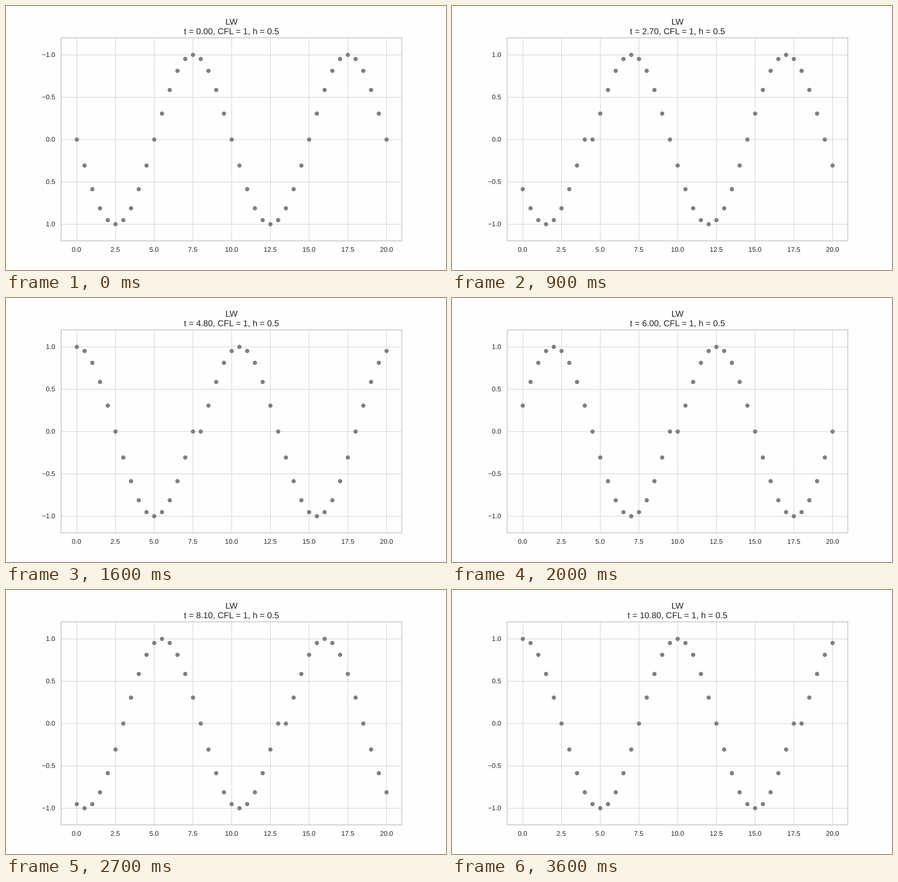
These frames come from a looping animation (966x580 px, 3700 ms). An HTML page:

```html
<!DOCTYPE html>
<html lang="en">
<head>
<meta charset="utf-8">
<title>Advected wave</title>
<style>
  html, body { margin: 0; width: 100%; height: 100%; overflow: hidden; background: #fefefe; }
  svg { display: block; width: 966px; height: 580px; }
  text {
    font-family: "Liberation Sans", Arial, sans-serif;
    font-size: 14.76px;
    fill: #262626;
    text-rendering: geometricPrecision;
  }
  .mid { text-anchor: middle; }
  .end { text-anchor: end; }
  .title { font-size: 18.8px; }
  .grid { stroke: #ccc; stroke-width: 1; }
  .frame { fill: none; stroke: #ccc; stroke-width: 2; }
  .dot { fill: #808080; }
</style>
</head>
<body>
<svg id="plot" viewBox="0 0 966 580"></svg>
<script>
const STEP_MS = 100, STEPS = 37, DT = 0.3;
const POINTS = 41, H = 0.5, WAVELENGTH = 10;
const LEFT = 121, RIGHT = 869, TOP = 70, BOTTOM = 516, MID_X = 495.1;

const plot = document.getElementById("plot");

function add(tag, attrs, text = "") {
  const node = document.createElementNS("http://www.w3.org/2000/svg", tag);
  for (const key in attrs) node.setAttribute(key, attrs[key]);
  node.textContent = text;
  return plot.appendChild(node);
}

// Data to stage; marks sit on pixel centres
const rawX = x => 120.75 + (x + 1) * 34.03;
const toX = x => Math.round(rawX(x)) + 0.5;
const toY = v => 293.5 - Math.round(v * 186.05);
const label = v => v.toFixed(1).replace("-", "\u2212");

for (let x = 0; x <= 20; x += 2.5) {
  add("line", { class: "grid", x1: toX(x), x2: toX(x), y1: TOP, y2: BOTTOM });
  add("text", { class: "mid", x: rawX(x), y: 540 }, label(x));
}

const ticks = [];
for (let v = -1; v <= 1; v += 0.5) {
  const y = toY(v);
  add("line", { class: "grid", x1: LEFT, x2: RIGHT, y1: y, y2: y });
  ticks.push({ v, node: add("text", { class: "end", x: 108, y: y + 4.8 }) });
}

const dots = Array.from({ length: POINTS }, (_, i) =>
  add("circle", { class: "dot", cx: toX(i * H), r: 4.7 }));

add("rect", { class: "frame", x: LEFT, y: TOP, width: RIGHT - LEFT, height: BOTTOM - TOP });
add("text", { class: "mid title", x: MID_X, y: 41.3 }, "LW");
const status = add("text", { class: "mid title", x: MID_X, y: 62 });

let shown = -1;

// The wave moves one cell per step and wraps over all the points.
// The vertical axis is upside down only before the first step.
function draw(step) {
  if (step === shown) return;
  shown = step;
  const dir = step === 0 ? -1 : 1;
  dots.forEach((dot, i) => {
    const from = (i - step + POINTS) % POINTS;
    const value = Math.sin(2 * Math.PI * from * H / WAVELENGTH);
    dot.setAttribute("cy", toY(dir * value));
  });
  for (const { v, node } of ticks) node.textContent = label(v === 0 ? 0 : dir * v);
  status.textContent = `t = ${(step * DT).toFixed(2)}, CFL = 1, h = 0.5`;
}

const start = performance.now();
function tick() {
  draw(Math.floor((performance.now() - start) / STEP_MS) % STEPS);
  requestAnimationFrame(tick);
}
tick();
</script>
</body>
</html>
```
